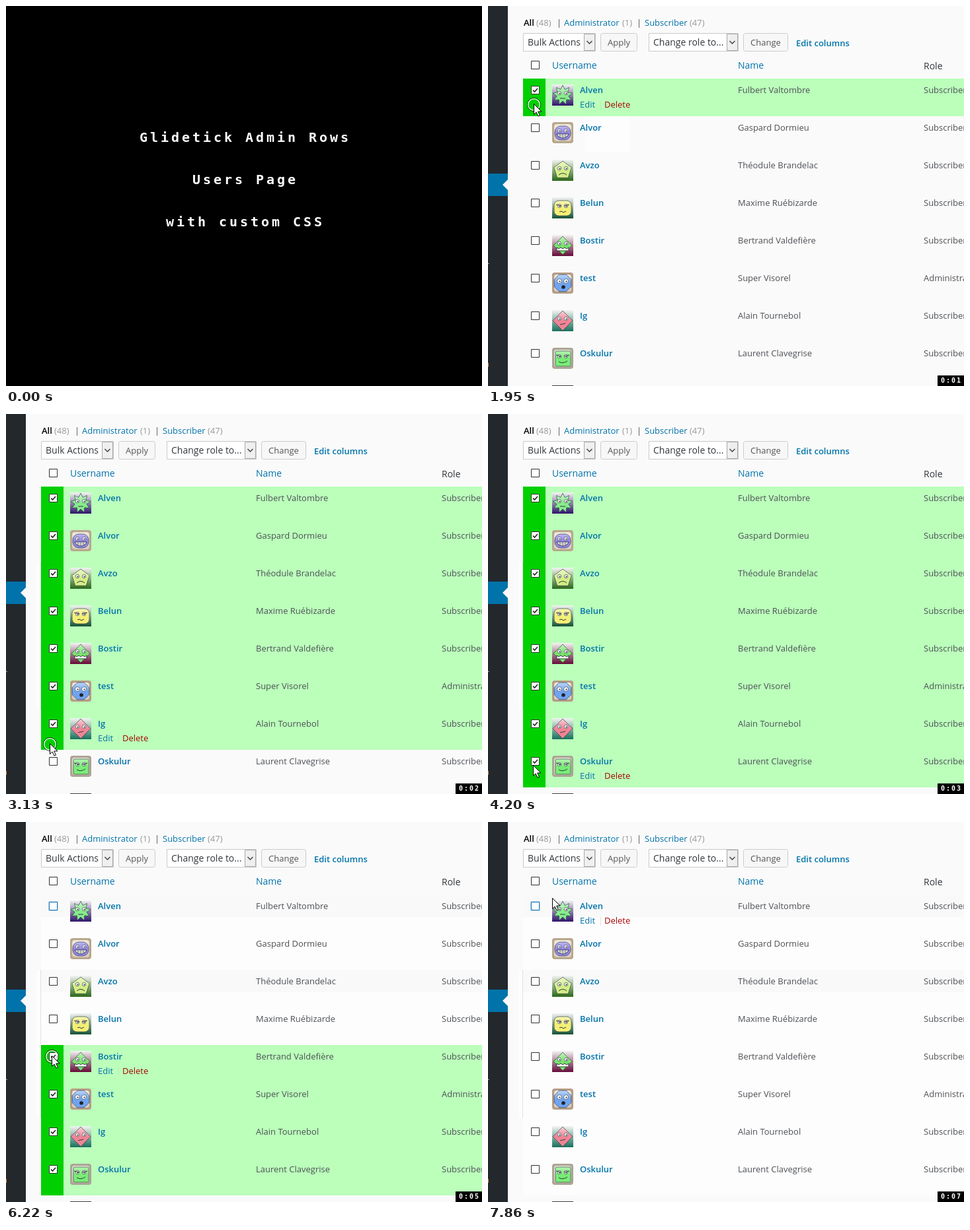
Animation, 720 px wide and 576 px high, one loop 8000 ms. Source, as an HTML page with a canvas:

```html
<!DOCTYPE html>
<html lang="en">
<head>
<meta charset="utf-8">
<title>Selecting table rows</title>
<style>
html, body { margin: 0; width: 100%; height: 100%; overflow: hidden; background: #000; }
canvas { display: block; }
</style>
</head>
<body>
<canvas id="stage" width="720" height="576"></canvas>
<script>
const ctx = document.getElementById('stage').getContext('2d');
const LOOP = 8000, TOP = 110, ROW = 57;
const SANS = '"Open Sans", "Noto Sans", sans-serif';
const MONO = '"DejaVu Sans Mono", monospace';
const LINK = '#0073aa', TEXT = '#4d5055', PAGE = '#fafafa';

const users = [
  ['Alven', 'Fulbert Valtombre'], ['Alvor', 'Gaspard Dormieu'],
  ['Avzo', 'Théodule Brandelac'], ['Belun', 'Maxime Ruébizarde'],
  ['Bostir', 'Bertrand Valdefière'], ['test', 'Super Visorel'],
  ['Ig', 'Alain Tournebol'], ['Oskulur', 'Laurent Clavegrise']
];

// Runs of evenly spaced screen updates: first, last, count
const runs = [
  [500, 630, 2], [770, 1140, 4], [1290, 1430, 2], [1710, 2410, 7],
  [2530, 3250, 7], [3370, 3590, 3], [3740, 3740, 1], [4200, 4540, 4],
  [4690, 4930, 3], [5090, 5210, 2], [5360, 5940, 6], [6090, 6800, 7],
  [6920, 7040, 2], [7180, 7340, 2], [7490, 7490, 1], [7640, 7860, 3]
];
const steps = runs.flatMap(([a, b, n]) =>
  Array.from({ length: n }, (_, i) => n > 1 ? Math.round(a + (b - a) * i / (n - 1)) : a));

// Pointer way points: time, x, y
const path = [
  [0, 182, 199], [630, 182, 199], [1140, 86, 136], [1290, 68, 122], [1710, 68, 122],
  [1950, 69, 149], [2410, 67, 212], [2530, 67, 240], [3010, 66, 455], [3130, 66, 499],
  [3250, 66, 508], [3590, 68, 536], [4200, 68, 532], [4540, 67, 413], [4690, 67, 365],
  [4930, 73, 191], [5090, 78, 160], [5210, 79, 133], [5480, 75, 129], [5600, 74, 133],
  [5940, 70, 215], [6090, 69, 260], [6220, 69, 364], [6340, 69, 385], [6680, 65, 512],
  [6800, 64, 535], [7040, 65, 537], [7180, 64, 532], [7340, 73, 512], [7490, 64, 514],
  [7640, 74, 440], [7750, 90, 155], [7860, 97, 115]
];

// Row under the pointer, and the selected span of rows
const hovers = [
  [0, 1], [1010, 0], [2070, 1], [2530, 2], [2650, 3], [2770, 4], [2890, 5], [3010, 6],
  [3370, 7], [4300, 6], [4430, 5], [4690, 4], [4810, 2], [5090, 0], [5830, 1],
  [6090, 2], [6200, 4], [6440, 5], [6560, 6], [6680, 7], [7640, 5], [7750, 0]
];
const spans = [
  [0, 0, 0], [1820, 0, 1], [2170, 0, 2], [2530, 0, 3], [2650, 0, 4], [2770, 0, 5],
  [2890, 0, 6], [3010, 0, 7], [3740, 0, 8], [5590, 1, 8], [5820, 2, 8], [6090, 3, 8],
  [6200, 4, 8], [6320, 5, 8], [6440, 6, 8], [7180, 8, 8]
];
const ticks = [[0, 0], [1430, 1], [2410, 2], [3480, 3], [4540, 4], [5590, 5], [6560, 6], [7640, 7]];

const last = (list, t) => list.filter(e => e[0] <= t).pop();
const within = (t, a, b) => t >= a && t < b;

function pointer(t) {
  const i = path.findIndex(p => p[0] > t);
  if (i < 0) return path[path.length - 1].slice(1);
  const [t0, x0, y0] = path[i - 1], [t1, x1, y1] = path[i];
  const k = (t - t0) / (t1 - t0);
  return [Math.round(x0 + (x1 - x0) * k), Math.round(y0 + (y1 - y0) * k)];
}

function rect(x, y, w, h, color) {
  ctx.fillStyle = color;
  ctx.fillRect(x, y, w, h);
}

function text(str, x, y, color = TEXT, size = 13, weight = 400, font = SANS, spacing = 0) {
  ctx.font = `${weight} ${size}px ${font}`;
  ctx.letterSpacing = spacing + 'px';
  ctx.fillStyle = color;
  ctx.fillText(str, x, y);
}

function shape(path, fill, stroke, width = 1) {
  if (fill) { ctx.fillStyle = fill; ctx.fill(path); }
  if (stroke) { ctx.strokeStyle = stroke; ctx.lineWidth = width; ctx.stroke(path); }
}

function box(x, y, w, h, r, fill, stroke) {
  const p = new Path2D();
  p.roundRect(x + .5, y + .5, w - 1, h - 1, r);
  shape(p, fill, stroke);
}

function ringOf(n, radii, turn = -90) {
  const p = new Path2D();
  for (let i = 0; i < n; i++) {
    const a = (turn + 360 * i / n) * Math.PI / 180, r = radii[i % radii.length];
    p.lineTo(r * Math.cos(a), r * Math.sin(a));
  }
  p.closePath();
  return p;
}

function dot(x, y, r, fill, stroke, width) {
  const p = new Path2D();
  p.arc(x, y, r, 0, 7);
  shape(p, fill, stroke, width);
}

function line(d, color, width = 1) {
  shape(new Path2D(d), null, color, width);
}

function shade(from, to, y0 = -16, y1 = 16) {
  const g = ctx.createLinearGradient(0, y0, 0, y1);
  g.addColorStop(0, from);
  g.addColorStop(1, to);
  return g;
}

const block = (x, y, w, h, r) => {
  const p = new Path2D();
  p.roundRect(x, y, w, h, r);
  return p;
};

// Each avatar: [framed, dark tone, body colour, body outline, mouth]
const avatars = [
  [0, '#30136c', '#86ed8c', ringOf(18, [15, 9]), 'M-4 5H4'],
  [1, '#b9a78d', '#9585ef', block(-12, -10, 24, 21, 9), 'M-9 2H9Q7 8 0 8Q-7 8-9 2Z'],
  [0, '#2b6818', '#d4ee86', ringOf(5, [14]), 'M-6 7Q0 2 6 7'],
  [0, '#145236', '#f3ef77', block(-13, -11, 26, 23, 7), 'M-5 6L-2 5L1 7L5 5'],
  [0, '#660b38', '#79e46c', ringOf(12, [14, 10, 10]), 'M-9 3L-6 5L-3 3L0 5L3 3L6 5L9 3V8H-9Z'],
  [1, '#b79c86', '#70a4f2', ringOf(8, [14], 22.5), ''],
  [0, '#19705d', '#ef8495', ringOf(4, [15]), 'M-4 6L4 4'],
  [1, '#aba594', '#79ed77', block(-11, -11, 23, 23, 2), 'M-6 5Q0 9 7 4']
];

function avatar(i, y) {
  const [framed, tone, body, outline, mouth] = avatars[i];
  ctx.save();
  ctx.translate(113, y + 25);
  if (framed) {
    shape(block(-16, -16, 32, 32, 4), tone);
    shape(block(-13, -13, 26, 26, 4), shade('#f0ebe2', '#d5c9bb'));
  } else {
    rect(-16, -16, 32, 32, shade('#f3f4f2', tone));
  }
  shape(outline, shade('#fff', body, -24, 0), 'rgba(40,60,60,.65)');
  for (const x of [-5, 5]) {
    dot(x, -3, i === 5 ? 3.5 : 2.8, '#f4f7fb', '#465052', .7);
    dot(x + .5, -2.5, 1, '#222');
  }
  if (i === 3 || i === 7) line('M-10-5L-2-3M2-3L10-5', '#333');
  if (i === 5) dot(1, 6, 2.8, '#222');
  const teeth = mouth.endsWith('Z');
  shape(new Path2D(mouth), teeth ? '#fff' : null, '#30383a');
  if (i === 1) line('M-7 5H7M-4 2V7M0 2V8M4 2V7', '#555', .7);
  ctx.restore();
}

function checkbox(y, checked, focus) {
  box(65, y, 13, 13, 0, '#fff', focus ? '#1e78b4' : '#333');
  if (focus) box(64, y - 1, 15, 15, 1, null, 'rgba(91,157,217,.45)');
  if (checked) line(`M68 ${y + 6.5}L70.5 ${y + 9}L75 ${y + 4}`, '#222', 1.6);
}

function select(x, w, label) {
  box(x, 41, w, 28, 0, '#fff', '#c9c9c9');
  box(x + w - 18, 42, 17, 26, 0, '#efefef', '#a9a9a9');
  const m = x + w - 9.5;
  line(`M${m - 4} 53L${m} 57L${m + 4} 53`, '#444', 1.5);
  text(label, x + 7, 60, '#32373c', 14);
}

function button(x, w, label) {
  box(x, 41, w, 28, 3, '#f7f7f7', '#ccc');
  text(label, x + 11, 60, '#555');
}

function sidebar() {
  rect(0, 0, 30, 576, '#23282d');
  rect(0, 254, 30, 34, LINK);
  shape(new Path2D('M30 263L22 271L30 279Z'), PAGE);
  rect(0, 390, 2, 1, '#aaa');
  rect(0, 541, 1, 6, '#d8843a');
}

function toolbar() {
  text('All', 54, 30, '#000', 13, 600);
  text('(48)', 73, 30, '#999');
  text('|', 104, 30, '#555');
  text('Administrator', 115, 30, LINK);
  text('(1)', 203, 30, '#999');
  text('|', 225, 30, '#555');
  text('Subscriber', 237, 30, LINK);
  text('(47)', 305, 30, '#999');
  select(53, 110, 'Bulk Actions');
  button(170, 56, 'Apply');
  select(243, 136, 'Change role to...');
  button(386, 68, 'Change');
  text('Edit columns', 466, 61, LINK, 13, 600);
  checkbox(83, false);
  text('Username', 97, 95, LINK, 14);
  text('Name', 378, 95, LINK, 14);
  text('Role', 659, 96, '#32373c', 14);
}

function row(i, t, hover, from, to) {
  const y = TOP + ROW * i, on = i >= from && i < to;
  if (on) {
    rect(53, y, 667, ROW, '#bbffbb');
    rect(53, y, 34, ROW, '#00d000');
  } else if (i < from) {
    rect(53, y, 667, ROW, '#fdfdfd');
    if (i === 0 || i === 2) rect(53, y, 667, 34, '#f9f9f9');
  }
  checkbox(y + 11, on, i === 0 && t >= 5360);
  avatar(i, y);
  const [user, name] = users[i];
  text(user, 139, y + 22, LINK, 13, 600);
  text(name, 378, y + 22);
  text(i === 5 ? 'Administrator' : 'Subscriber', 659, y + 22);
  if (hover) {
    text('Edit', 139, y + 44, LINK);
    text('|', 167, y + 44, on ? '#b6eab6' : '#ddd');
    text('Delete', 176, y + 44, t < 770 ? '#c00' : '#a00');
  }
}

const arrow = new Path2D('M.5 .5V16.5L4 13L7 19L9.5 18L6.7 12H12Z');
const hand = new Path2D('M-2 1.5Q0-1 2 1.5V8Q4 6.5 5.5 9Q7 7.5 8.3 10Q10 9.3 10 12V16L8 20V23H-2V20L-6 14.5Q-6.5 11-4.5 11.5L-2 14Z');

function cursor(t) {
  const [x, y] = pointer(t);
  ctx.save();
  ctx.translate(x, y);
  if (within(t, 1710, 4200) || within(t, 5470, 7180)) {
    dot(.5, 1.5, 10, null, '#111', 1);
    dot(.5, 1.5, 8.9, null, '#fff', 1.3);
  }
  const link = t < 760 || within(t, 1290, 1940) || within(t, 5210, 5700);
  shape(link ? hand : arrow, '#fff', '#000');
  if (link) line('M2 8V12M5.5 9V13M8.3 10V13', '#000');
  ctx.restore();
}

function titleCard() {
  rect(0, 0, 720, 576, '#000');
  const cell = 16, lines = ['Glidetick Admin Rows', 'Users Page', 'with custom CSS'];
  lines.forEach((s, i) =>
    text(s, 362 - s.length * cell / 2, 206 + 64 * i, '#fff', 20, 700, MONO, 3.96));
}

function screen(t) {
  const [, from, to] = last(spans, t), hover = last(hovers, t)[1];
  rect(0, 0, 720, 576, PAGE);
  sidebar();
  if (t >= 2530) {
    rect(46, 224, 7, 225, '#fdfdfd');
    rect(52, 224, 1, 225, '#e2e2e2');
  }
  toolbar();
  if (t >= 1010) rect(146, 167, 69, 55, '#fdfdfd');
  users.forEach((_, i) => row(i, t, i === hover, from, to));
  rect(97, 575, 32, 1, '#3c3c3c');
  cursor(t);
  rect(680, 560, 40, 16, '#000');
  text('0:0' + last(ticks, t)[1], 685, 571, '#fff', 10, 700, MONO, 1.98);
}

function draw() {
  const t = performance.now() % LOOP;
  if (t < 500) titleCard();
  else screen(steps.filter(s => s <= t).pop());
  requestAnimationFrame(draw);
}
draw();
</script>
</body>
</html>
```
